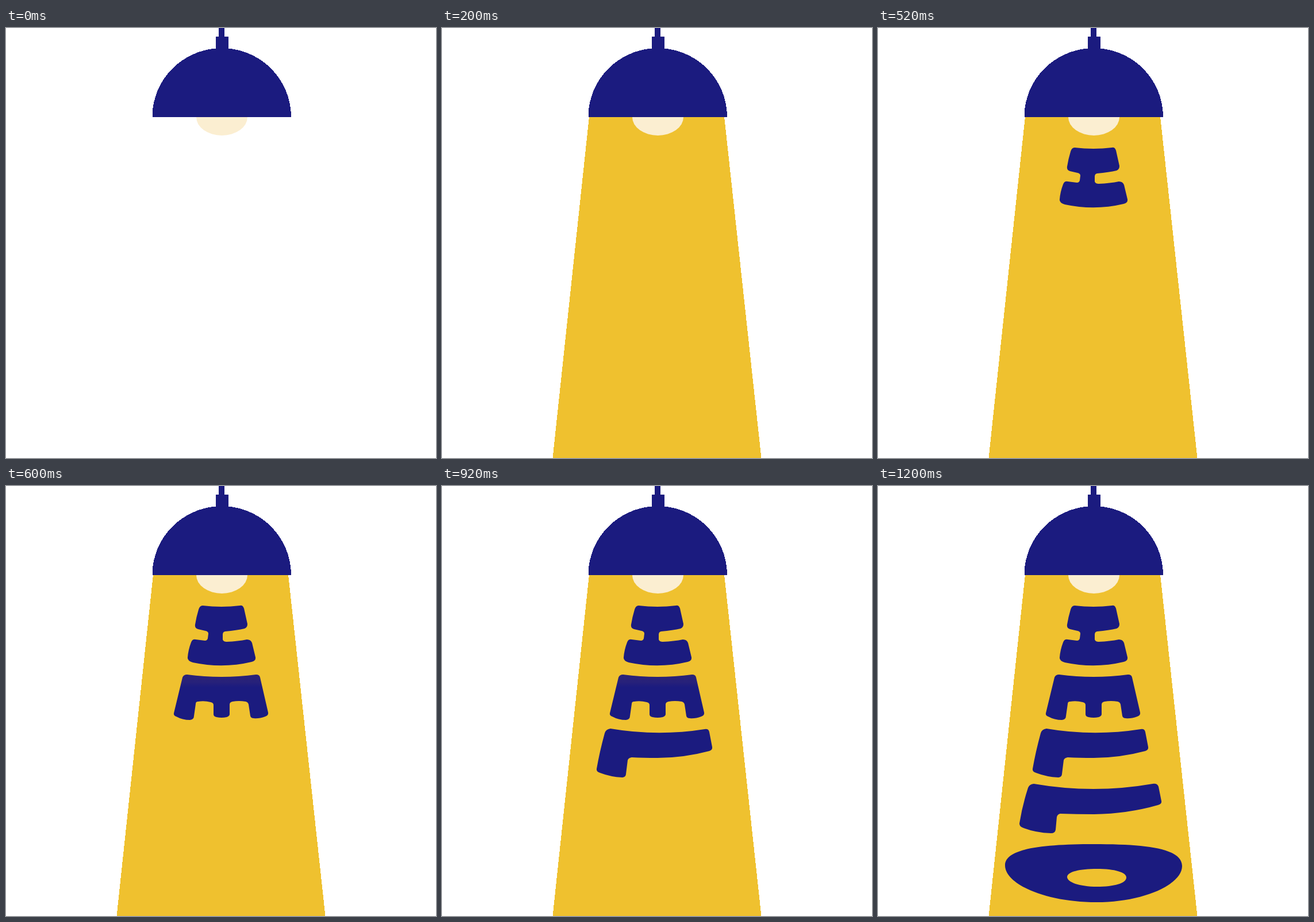
Recreate the animation shown at these times as an HTML page. Size 748 by 748 pixels, loop 1.4 s.

```html
<!DOCTYPE html>
<html lang="en">
<head>
<meta charset="utf-8">
<title>Hello lamp</title>
<style>
  html, body { margin: 0; width: 100%; height: 100%; overflow: hidden; background: #fff; }
  svg { display: block; width: 100%; height: 100%; }
  .hard { shape-rendering: crispEdges; }
</style>
</head>
<body>
<svg viewBox="0 0 748 748" fill="#1b1b7f">
  <defs>
    <linearGradient id="worn" gradientUnits="userSpaceOnUse" x1="0" y1="328" x2="0" y2="350">
      <stop offset="0" stop-color="#2b2376"/>
      <stop offset=".6" stop-color="#27217a"/>
      <stop offset="1" stop-color="#1b1b7f"/>
    </linearGradient>
  </defs>

  <path class="part hard" fill="#efc12f" d="M256 154H491L555.5 748H192.5Z"/>
  <path fill="#fbeed1" d="M331 155A44.5 32 0 0 0 420 155Z"/>
  <path class="hard" d="M370 0H380V15H386.5V35.5A121 120 0 0 1 496 151V155H254.500V151A121 120 0 0 1 364.500 35.500V15H370Z"/>

  <path class="part" d="M342 208Q375 212 407 208Q412 207 414 213L420 240Q420 246 415 248Q402 251 381 253Q377 254 377 258V267Q378 271 384 271Q404 270 419 267Q426 267 428 273L434 298Q435 304 427 306Q377 318 325 307Q315 304 316 298Q317 285 322 272Q324 266 330 267L346 269Q350 269 351 265L352 257Q352 253 347 252L334 249Q328 247 329 241Q331 228 335 215Q337 208 342 208Z"/>
  <path class="part" id="e" d="M315 328Q375 336 435 328Q441 328 442 333L456 394Q457 399 451 401Q440 405 431 404Q426 404 425 400L422 380Q421 376 417 375Q405 373 394 375Q389 376 389 380V397Q389 400 384 402Q375 404 366 402Q361 401 361 397V381Q361 377 356 376Q345 373 334 375Q330 375 330 379L327 400Q327 406 320 407Q307 407 296 401Q291 399 292 395L307 333Q309 328 315 328Z"/>
  <path class="part" d="M293 422Q375 436 457 423Q464 422 465 428L470 454Q471 459 465 461Q420 473 375 473Q350 473 330 472Q324 473 323 477L320 501Q320 506 314 507Q293 506 275 499Q268 497 269 492Q274 463 283 430Q285 423 293 422Z"/>
  <path class="part" d="M271 518Q375 536 478 518Q486 517 488 523L493 548Q494 553 487 555Q435 570 376 571Q345 571 317 570Q312 571 311 576L309 598Q308 604 301 604Q273 603 251 594Q246 592 246 587Q251 556 261 525Q263 519 271 518Z"/>
  <path class="part" fill-rule="evenodd" d="M221 659C222 630 290 623 375 623C468 623 528 630 529 661C529 694 460 724 380 724C290 724 220 692 221 659ZM329 680C330 671 350 666 381 666C412 666 432 672 432 681C432 691 411 697 381 697C350 697 329 689 329 680Z"/>
</svg>
<script>
  const STEP = 200, LOOP = 1400;
  const parts = document.querySelectorAll('.part');
  const e = document.getElementById('e');

  // The beam and then each letter switch on, one per step.
  function draw(now) {
    const step = Math.floor(now % LOOP / STEP);
    parts.forEach((part, i) => part.style.visibility = i < step ? 'visible' : 'hidden');
    e.style.fill = step < 6 ? 'url(#worn)' : '';
  }

  function tick() {
    draw(performance.now());
    requestAnimationFrame(tick);
  }
  tick();
</script>
</body>
</html>
```
